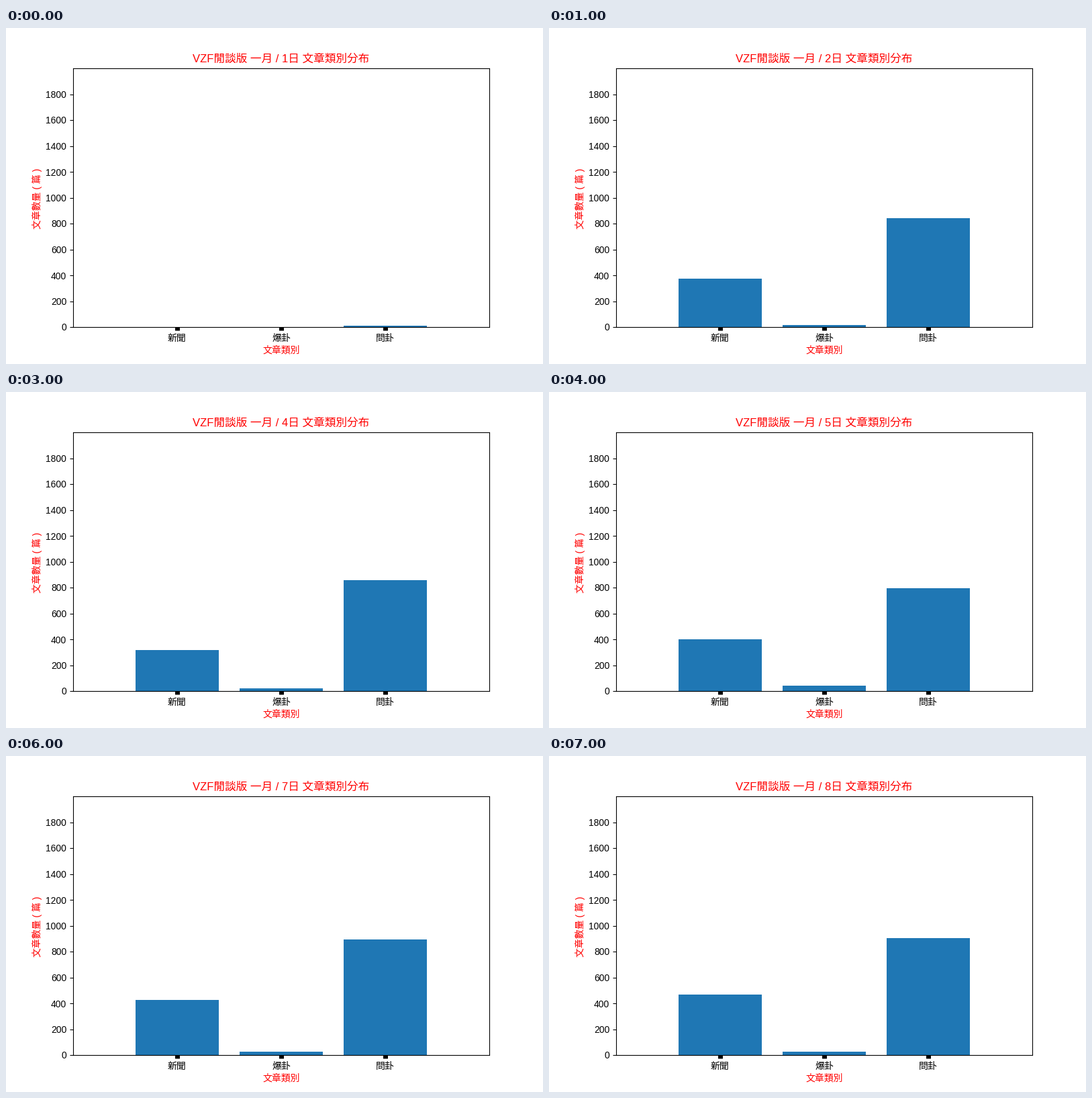
Write a matplotlib script that moves like this. It is 800x500 px and loops after 8 s.

```python
import matplotlib.pyplot as plt
import numpy as np
from matplotlib.animation import FuncAnimation

plt.rcParams["font.family"] = ["Liberation Sans", "Noto Sans CJK JP"]

CATEGORIES = ["新聞", "爆卦", "問卦"]
DAYS = 8
MID_DAY = 5


def post_counts(day):
    """Posts per category: a slow rise with a mid-period surge."""
    if day == 1:
        return 0, 0, 10  # counting has only just begun
    t = day - MID_DAY
    surge = np.exp(-3 * t**2)
    news = 360 + 15.6 * t + 5.4 * t**2 + 40 * np.cos(0.8 * np.pi * t)
    gossip = 21 + 1.5 * t + 21 * surge
    questions = 873 + 10 * t - 78 * surge
    return news, gossip, questions


fig, ax = plt.subplots(figsize=(8, 5), dpi=100)
fig.subplots_adjust(left=0.125, right=0.9, bottom=0.11, top=0.88)

slots = range(1, len(CATEGORIES) + 1)
bars = ax.bar(slots, post_counts(1), width=0.8, color="#1f77b4")
ax.set_xlim(0, 4)
ax.set_ylim(0, 2000)
ax.set_xticks(slots, CATEGORIES)
ax.set_yticks(range(0, 2000, 200))
ax.tick_params(axis="x", width=5)
ax.set_xlabel("文章類別", color="red", labelpad=3)
ax.set_ylabel("文章數量 ( 篇 )", color="red", y=0.496)
title = ax.set_title("", color="red", fontsize=12, pad=7)


def update(frame):
    day = frame + 1
    for bar, count in zip(bars, post_counts(day)):
        bar.set_height(count)
    title.set_text(f"VZF閒談版 一月 / {day}日 文章類別分布")
    return [*bars, title]


anim = FuncAnimation(fig, update, frames=DAYS, interval=1000,
                     repeat=True, repeat_delay=0)
plt.show()
```
